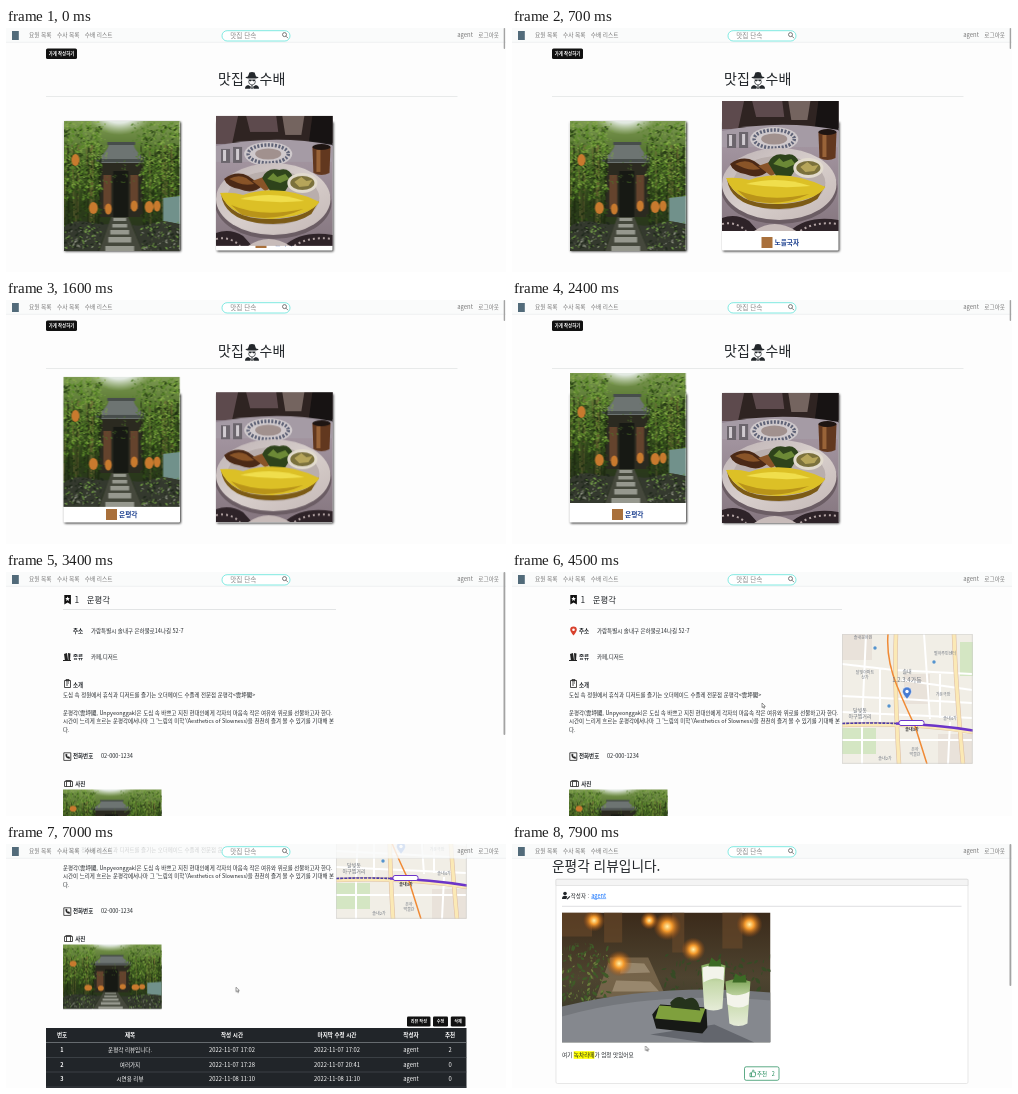
Recreate the animation shown at these times as an HTML page. Size 500 by 244 pixels, loop 8000 ms.

```html
<!DOCTYPE html>
<html lang="ko">
<head>
<meta charset="utf-8">
<title>맛집 수배</title>
<style>
html,body{margin:0;width:100%;height:100%;overflow:hidden;background:#fff}
svg.stage{display:block;width:100vw;height:100vh}
text{font:5.5px "Noto Sans CJK KR","Noto Sans CJK JP","Noto Sans CJK",sans-serif;fill:#212529;white-space:pre}
.b{font-weight:700}
.nav text{font-size:5.65px;fill:#777}
.nav .hint{font-size:6.6px;fill:#858585}
.h1{font-size:14px}
.para text{font-size:5.47px}
.btn rect{fill:#111}
.btn text{fill:#fff;font-size:4.1px;font-weight:700;text-anchor:middle}
.cap{font-size:6.7px;font-weight:700;fill:#1b3f8f}
.table text{fill:#fff;text-anchor:middle}
.map text{font-size:4px;fill:#6f7680;text-anchor:middle}
.base{fill:#fff;filter:drop-shadow(1px 1.5px 1.3px rgba(0,0,0,.8))}
.thumb{fill:#a3a3a3}
.list,.detail,.review,.late,.right,.left,.scroll,.bar,.fade{animation:8s infinite}
.list{animation-name:list;animation-timing-function:step-end}
.detail{animation-name:detail;animation-timing-function:step-end}
.review{animation-name:review;animation-timing-function:step-end}
.late{animation-name:late;animation-timing-function:step-end}
.right{animation-name:right}
.left{animation-name:left}
.scroll{animation-name:scroll}
.bar{animation-name:bar}
.fade{animation-name:fade;animation-timing-function:linear}
.cursor{animation:move 8s ease-in-out infinite,show 8s step-end infinite}
@keyframes list{0%{visibility:visible}42.5%,100%{visibility:hidden}}
@keyframes detail{0%{visibility:hidden}42.5%{visibility:visible}95%,100%{visibility:hidden}}
@keyframes review{0%{visibility:hidden}95%,100%{visibility:visible}}
@keyframes late{0%{visibility:hidden}45%{visibility:visible}95%,100%{visibility:hidden}}
@keyframes show{0%{visibility:hidden}43.75%,100%{visibility:visible}}
@keyframes right{
  0%{transform:translateY(-5px);animation-timing-function:cubic-bezier(.2,.6,.3,1)}
  7.8%,12.5%{transform:translateY(-20px);animation-timing-function:ease}
  22.5%,100%{transform:none}}
@keyframes left{
  0%,15%{transform:none;animation-timing-function:ease}
  25%,100%{transform:translateY(-20px)}}
@keyframes scroll{
  0%,58.75%{transform:none;animation-timing-function:cubic-bezier(.35,.1,.35,1)}
  67.5%,100%{transform:translateY(-117px)}}
@keyframes bar{
  0%,58.75%{transform:none;animation-timing-function:cubic-bezier(.35,.1,.35,1)}
  67.5%,100%{transform:translateY(79px)}}
@keyframes fade{0%,52.5%{opacity:1}56.25%,58.75%{opacity:0}60%,73.75%{opacity:1}77.5%,100%{opacity:0}}
@keyframes move{
  0%,43.75%{transform:translate(104px,122px)}
  52.5%,85.5%{transform:translate(250px,131px)}
  92.5%,100%{transform:translate(133.5px,202px)}}
</style>
</head>
<body>
<svg class="stage" viewBox="0 0 500 244" preserveAspectRatio="none">
<defs>
  <linearGradient id="wood" x2="0" y2="1"><stop stop-color="#7d9a52"/><stop offset=".3" stop-color="#4c6a28"/><stop offset=".65" stop-color="#2a3d18"/><stop offset="1" stop-color="#2b3024"/></linearGradient>
  <radialGradient id="sky" cx=".5" cy=".1"><stop stop-color="#f4f6f5"/><stop offset=".6" stop-color="#e2e9e2"/><stop offset="1" stop-color="#c5d4b4" stop-opacity="0"/></radialGradient>
  <linearGradient id="cloth" x2="0" y2="1"><stop stop-color="#6f6270"/><stop offset=".35" stop-color="#a2949f"/><stop offset="1" stop-color="#85767f"/></linearGradient>
  <linearGradient id="plate" x2="1" y2="1"><stop stop-color="#bdb2b4"/><stop offset=".5" stop-color="#d8cfcc"/><stop offset="1" stop-color="#c4b8b6"/></linearGradient>
  <linearGradient id="dusk" x2="0" y2="1"><stop stop-color="#3b2a1a"/><stop offset=".5" stop-color="#4e4430"/><stop offset="1" stop-color="#2e3324"/></linearGradient>
  <linearGradient id="latte" x2="0" y2="1"><stop stop-color="#7da356"/><stop offset=".4" stop-color="#c4d8a8"/><stop offset="1" stop-color="#e6ecd8"/></linearGradient>
  <radialGradient id="glow"><stop stop-color="#fff0a8"/><stop offset=".35" stop-color="#f59a2c"/><stop offset="1" stop-color="#a04a10" stop-opacity="0"/></radialGradient>

  <symbol id="garden" viewBox="0 0 117 130" preserveAspectRatio="none">
    <path fill="url(#wood)" d="M0 0h117v130H0z"/>
    <ellipse cx="56" cy="8" rx="36" ry="30" fill="url(#sky)"/>
    <path fill="#2b2a20" d="M36 40h44v56H36z"/>
    <path fill="#64432d" d="M40 54h8v34h-8zM67 54h8v34h-8z"/>
    <path fill="#171914" d="M50 50h15v46H50z"/>
    <path fill="#6d7472" d="M32 38q11-5 14-15h24q3 10 14 15l-3 4H35z"/>
    <path fill="#474d4b" d="M44 21h28v3H44zM33 38h50v3H33z"/>
    <g id="stems" fill="none" stroke-width=".8"></g>
    <g id="leaves"></g>
    <path fill="#71918b" d="M100 77l17-2v28l-17-3z"/>
    <path fill="#34392e" d="M0 106q10-8 24-5t22 2l-12 27H0zM117 104q-14-6-26-2t-22 2l10 26h38z"/>
    <path fill="#45483c" d="M48 96h17l14 34H36z"/>
    <path fill="#96988e" d="M50 97h13v3H50zM49 103h15v3.500H49zM47 109h19v4.500H47zM45 116h23v5.500H45zM42 125h29v5H42z"/>
    <g id="shrubs"></g>
    <g fill="#c87a2e"><ellipse cx="12" cy="39" rx="4" ry="6"/><ellipse cx="30" cy="87" rx="4.500" ry="6"/><ellipse cx="45" cy="88" rx="3.500" ry="5.500"/><ellipse cx="71" cy="85" rx="3.500" ry="5.500"/><ellipse cx="86" cy="86" rx="4.500" ry="6"/><ellipse cx="94" cy="85" rx="3.500" ry="5.500"/></g>
  </symbol>

  <symbol id="meal" viewBox="0 0 116 130" preserveAspectRatio="none">
    <path fill="url(#cloth)" d="M0 0h116v130H0z"/>
    <path fill="#2f2422" d="M0 0h116v27H0z"/>
    <path fill="#5d4a4d" d="M0 0h22l-6 28H0zM30 0h30l2 16H34z"/>
    <path fill="#74645f" d="M66 0h22l-3 19H69z"/>
    <path fill="#171313" d="M96 0h20v30H92z"/>
    <path fill="#a59ba5" d="M0 30q58-12 116-1v17H0z"/>
    <ellipse cx="52" cy="38" rx="24" ry="12" fill="#cfc9cc"/>
    <ellipse cx="52" cy="38" rx="20" ry="9" fill="none" stroke="#5f6377" stroke-width="3.500" stroke-dasharray="2 1.500"/>
    <ellipse cx="52" cy="38" rx="13" ry="5.500" fill="#a1918e"/>
    <path fill="#6b656c" d="M5 33h9v14H5zM17 31h9v16h-9z"/><path fill="#d0cbd0" d="M7 34h3v11H7zM20 33h3v11h-3z"/>
    <path fill="#62381f" d="M96 31q9-4 18 0l-1 26q-8 4-16 0z"/><path fill="#996338" d="M100 34h4v22h-4z"/><ellipse cx="105" cy="31" rx="9" ry="3" fill="#1e1512"/>
    <ellipse cx="57" cy="87" rx="58" ry="36" fill="#6b5d64"/>
    <ellipse cx="57" cy="83" rx="57" ry="36" fill="url(#plate)"/>
    <ellipse cx="57" cy="82" rx="46" ry="27" fill="#b9aeac"/>
    <path fill="#4b2916" d="M8 63q12-9 24-3l14 10q-9 9-23 3-12-2-15-10z"/>
    <path fill="#895428" d="M13 63q9-5 17-1l8 6q-9 2-16-1zM36 65l20-7 9 9-16 8z"/>
    <path fill="#2e431b" d="M46 62q5-11 17-8 10-3 14 8l-8 13H54z"/>
    <path fill="#6c8936" d="M51 63l6-6 4 4 8-3 4 5-9 4z"/>
    <ellipse cx="86" cy="67" rx="15" ry="10" fill="#e2dbce"/><ellipse cx="86" cy="67" rx="12" ry="7" fill="#7b713c"/>
    <path fill="#b6a55a" d="M78 66l7-5 5 4 6-1-4 6-9 1z"/>
    <path fill="#7c5b16" d="M5 78q10 25 46 25 40 1 52-19l-8 14q-18 13-54 9Q8 102 5 78z"/>
    <path fill="#dcc026" d="M4 77q13-1 23 2 37-12 76 7-9 14-47 17Q14 103 4 77z"/>
    <path fill="#f0de4c" d="M24 83q33-9 64 2-31 3-64-2z"/>
    <path fill="#b99419" d="M15 89q30 13 72 4-30 14-61 6z"/>
    <path fill="#2e2328" d="M0 117q14-5 27 3l9 10H0zM68 130q17-16 48-11v11z"/>
    <path fill="none" stroke="#b3a4a4" stroke-width="2" stroke-dasharray="2 3" d="M0 123q14-3 24 7M78 130q14-10 38-7"/>
    <path fill="#c7bbb9" d="M32 130q20-14 42 0z"/>
  </symbol>

  <symbol id="drinks" viewBox="0 0 208 130" preserveAspectRatio="none">
    <path fill="url(#dusk)" d="M0 0h208v130H0z"/>
    <path fill="#6b4a2b" d="M0 0h30v24H0zM42 0h18v30H42zM110 0h12v40h-12zM160 0h20v36h-20z" opacity=".6"/>
    <path fill="#8b7558" d="M48 45h38l18 40H34z" opacity=".65"/>
    <path fill="#a8987c" d="M60 50l22 1 6 9-30 1zM54 68l34 1 9 10H50z" opacity=".7"/>
    <g id="hedge"></g>
    <path fill="#74777c" d="M0 94q100-24 208-14v50H0z"/>
    <path fill="#8e9196" d="M0 104q90-26 208-16v42H0z" opacity=".7"/>
    <path fill="#4e5157" d="M88 122l54 8h50l-40-18z" opacity=".6"/>
    <g fill="url(#glow)"><circle cx="57" cy="51" r="13"/><circle cx="105" cy="14" r="14"/><circle cx="131" cy="37" r="12"/><circle cx="32" cy="8" r="11"/><circle cx="87" cy="8" r="9"/><circle cx="187" cy="12" r="13"/></g>
    <path fill="#171916" d="M90 102l8-10 46 3 1 20-5 6-46-5z"/>
    <path fill="#7fa03d" d="M97 93l46 3-5 14-45-4z"/>
    <path fill="#25331c" d="M108 90q8-9 15-3 9-5 13 4l2 7-29-3z"/>
    <path fill="url(#latte)" d="M139 53q12-5 24 0l-3 43q-9 4-18 0z"/>
    <path fill="#f3f4eb" d="M140 55q11-4 22 0l-1 13q-8-5-20 2z"/>
    <path fill="url(#latte)" d="M163 69q12-5 25 0l-3 42q-9 5-18 0z"/>
    <path fill="#f3f4eb" d="M164 80q10 6 23-1l-1 13q-9 6-21 0z"/>
    <path fill="#3c6a25" d="M146 54l3-9 5 4 4-3 1 8zM170 70l3-9 5 3 5-2 1 8z"/>
  </symbol>
</defs>

<path fill="#fdfdfd" d="M0 0h500v244H0z"/>

<g class="list">
  <g class="btn"><rect x="40" y="20.500" width="31" height="10.500" rx="1.600"/><text x="55.500" y="27.300" style="font-size:4.400px">가게 작성하기</text></g>
  <text class="h1" x="212" y="56.200">맛집</text><text class="h1" x="253.500" y="56.200">수배</text>
  <g fill="#23272b">
    <path d="M242 48.500l1.400-3.900q2.600-1 5.200 0l1.400 3.900q2.600.5 2.600 1.100t-2.600.8h-8q-2.600-.2-2.600-.8t2.600-1.100z"/>
    <path d="M242.600 51.400h3l.4.500.4-.5h3v1.200q-1.200 1.500-2.700.1l-.7-.5-.7.5q-1.500 1.400-2.700-.1z"/>
    <path d="M239 60.700q0-3 3.200-3.700l2.800 1.700-.6 2zM253 60.700q0-3-3.200-3.700l-2.800 1.700.6 2zM245.200 57.300h1.600l-.4 1.200.5 2.200h-1.800l.5-2.200z"/>
    <path fill="none" stroke="#23272b" stroke-width=".7" d="M242.400 53.300q.4 3.500 3.600 3.700 3.200-.2 3.600-3.700"/>
  </g>
  <path stroke="#e0e2e3" stroke-width=".7" d="M40 68.500h411.500"/>

  <rect class="base" x="57.500" y="93" width="116.500" height="129.500" rx="1"/>
  <rect x="100" y="209" width="11" height="11" fill="#a9703b"/><text class="cap" x="113" y="217">운평각</text>
  <use class="left" href="#garden" x="57.500" y="93" width="116.500" height="130"/>

  <rect class="base" x="210" y="93" width="116.500" height="129.500" rx="1"/>
  <rect x="249.500" y="209" width="11" height="11" fill="#a9703b"/><text class="cap" x="262.500" y="217">노을국자</text>
  <use class="right" href="#meal" x="210" y="93" width="116.500" height="130"/>
</g>

<g class="detail">
  <g class="scroll">
    <path fill="#111" d="M58.300 23h6.600v9.500l-3.300-2-3.300 2z"/><path fill="#fff" d="M61.600 24.500l.7 1.500 1.600.2-1.200 1.100.3 1.600-1.400-.8-1.400.8.3-1.600-1.200-1.100 1.600-.2z"/>
    <text x="68.500" y="30.500" style="font-size:8.400px">1</text><text x="80.800" y="30.500" style="font-size:8.400px">운평각</text>
    <path stroke="#d6d8da" stroke-width=".7" d="M57 37.500h273"/>

    <text class="b" x="67" y="60.600">주소</text><text x="85" y="60.600">가람특별시 솔내구 은하물로14나길 52-7</text>
    <text class="b" x="67" y="87.100">종류</text><text x="85" y="87.100">카페,디저트</text>
    <path fill="#222" d="M58 82l3-1 1 7-3 1zM62 81l2.500.6-.5 7-1.500.4zM57 88h8v1h-8z"/>
    <g fill="none" stroke="#222" stroke-width=".8"><path d="M58.500 108.500h6v7h-6zM60 107.500h3v1.600h-3zM60 111h3M60 113h2"/><path d="M57.800 180.800h7v7.600h-7z"/><path d="M59.500 182.500q0 4 4 4.200l.4-1.300-1.200-.8-.8.5-1-1.400.5-.7-.7-1z" fill="#222" stroke-width=".3"/><path d="M58.500 209.500h8v5h-8zM60.500 209.500v5M64.500 209.500v5M59.500 208.500h6"/></g>
    <text class="b" x="67" y="114.800">소개</text>
    <g class="para">
      <text x="57" y="125">도심 속 정원에서 휴식과 디저트를 즐기는 오더메이드 수플레 전문점 운평각&lt;雲坪閣&gt;</text>
      <text x="57" y="142.500">운평각(雲坪閣, Unpyeonggak)은 도심 속 바쁘고 지친 현대인에게 각자의 마음속 작은 여유와 위로를 선물하고자 한다.</text>
      <text x="57" y="151">시간이 느리게 흐르는 운평각에서나마 그 '느림의 미학'(Aesthetics of Slowness)을 천천히 즐겨 볼 수 있기를 기대해 본</text>
      <text x="57" y="159.600">다.</text>
    </g>
    <text class="b" x="67" y="186.200">전화번호</text><text x="95" y="186.200" style="font-size:5.600px">02-000-1234</text>
    <text class="b" x="69.300" y="213.600">사진</text>
    <use href="#garden" x="57" y="217.500" width="98.500" height="64.500"/>

    <g class="late">
      <path fill="#d8402c" d="M61.500 63.500q-3.300-4-3.300-5.800a3.300 3.300 0 0 1 6.600 0q0 1.800-3.300 5.800z"/><circle cx="61.500" cy="57.700" r="1.300" fill="#fff"/>
      <svg class="map" x="330" y="62" width="130.500" height="129.500" viewBox="0 0 130.500 129.500">
        <path fill="#f1eee6" d="M0 0h131v130H0z"/>
        <path fill="#e9e2da" d="M0 0h30v26H0zM62 40h26v30H62zM96 100h34v30H96z"/>
        <path fill="#d4e6c3" d="M0 94h34v26H0zM118 8h13v34h-13z"/>
        <g fill="none" stroke="#fff" stroke-width="2"><path d="M0 30l52 6 78 4M0 62l60 3 70 4M24 0l-4 90M82 0l6 85M0 106h130M20 130V92M108 88l-2 42M60 46l70 10M0 78l130 6M38 34v56M98 40v44"/></g>
        <path fill="none" stroke="#dfc0a6" stroke-width="4.500" d="M54 0q-2 45 3 130M0 91q70-3 131 7M112 0q2 55 9 130"/>
        <path fill="none" stroke="#fbe9b5" stroke-width="3.300" d="M54 0q-2 45 3 130M0 91q70-3 131 7M112 0q2 55 9 130"/>
        <path fill="none" stroke="#f08a35" stroke-width="1.500" d="M46 0q-2 25 9 52 10 24 18 40l12 38"/>
        <path fill="none" stroke="#4a3aa8" stroke-width="1.600" stroke-dasharray="3 1" d="M0 89.500q30-1 54 0"/>
        <path fill="none" stroke="#6c35c9" stroke-width="2.400" d="M54 89.500q40 1 77 7"/>
        <rect x="57" y="86.500" width="25" height="5" rx="2" fill="#fff" stroke="#6c35c9" stroke-width="1"/>
        <text x="21" y="5">솔내문화원</text><text x="23" y="40">달빛아파트<tspan x="23" dy="5">상가</tspan></text>
        <text x="103" y="21">별하주민센터</text><text x="101" y="62">가온극장</text>
        <text x="65" y="39" style="font-size:5px">솔내</text><text x="65" y="48" style="font-size:6px">1.2.3.4가동</text>
        <text x="18" y="78" style="font-size:5px">달빛동<tspan x="18" dy="6">아구찜거리</tspan></text>
        <text class="b" x="70" y="97" style="fill:#333">솔내3가</text><text x="108" y="86">솔내4가</text>
        <text x="73" y="117">은하<tspan x="73" dy="5">박물관</tspan></text><text x="43" y="126">솔내2가</text>
        <g fill="#5594cf"><circle cx="33" cy="14" r="1.700"/><circle cx="92" cy="28" r="1.700"/><circle cx="47" cy="72" r="1.700"/></g>
        <path fill="#477bd2" stroke="#fff" stroke-width=".5" d="M65 65q-4.500-5-4.500-7.500a4.500 4.500 0 0 1 9 0q0 2.500-4.500 7.500z"/><circle cx="65" cy="57.500" r="1.700" fill="#fff"/>
        <path fill="none" stroke="#ccc" stroke-width=".6" d="M.3.300h130v129H.300z"/>
      </svg>
    </g>

    <g class="btn"><rect x="401" y="289.500" width="23.500" height="10" rx="1.300"/><text x="412.800" y="296">리뷰 작성</text><rect x="427" y="289.500" width="15" height="10" rx="1.300"/><text x="434.500" y="296">수정</text><rect x="444.800" y="289.500" width="14.700" height="10" rx="1.300"/><text x="452.100" y="296">삭제</text></g>
    <path fill="#212529" d="M40 301h420.500v60H40z"/>
    <path stroke="#555b60" stroke-width=".5" d="M40 330.500h420.500M40 345h420.500M40 360h420.500"/><path stroke="#858a8f" stroke-width=".7" d="M40 315.500h420.500"/>
    <g class="table" id="rows"></g>
  </g>
</g>

<g class="review">
  <text x="40" y="27" style="font-size:13.700px">운평각 리뷰입니다.</text>
  <rect x="44" y="35" width="412" height="204.500" rx="1.500" fill="#fff" stroke="#d8d8d8" stroke-width=".6"/><path fill="#f4f4f4" stroke="#d8d8d8" stroke-width=".6" d="M44 35.500h412v6H44z"/>
  <g fill="#212529"><circle cx="53" cy="49.500" r="1.800"/><path d="M50 55q0-3.200 3-3.200 1.500 0 2.300.8l-1 2.400zM55 54.500l2.500-2.500.8.800-2.500 2.400-1 .200z"/></g>
  <text x="58.800" y="53.500">작성자 :</text><text x="79.200" y="53.500" style="fill:#0d6efd;font-size:5.600px">agent</text><path stroke="#0d6efd" stroke-width=".5" d="M79.200 54.600h15"/>
  <path stroke="#d0d2d4" stroke-width=".7" d="M50 62.300h399.500"/>
  <use href="#drinks" x="50" y="68.500" width="208.500" height="130"/>
  <path fill="#ff0" d="M61.700 207.200h20.700v7.600H61.700z"/><text x="50" y="213.100" style="font-size:5.600px">여기 녹차라떼가 엄청 맛있어요</text>
  <rect x="232.500" y="222.800" width="34.500" height="13.500" rx="1.700" fill="#fff" stroke="#198754" stroke-width=".7"/>
  <path fill="none" stroke="#198754" stroke-width=".7" d="M238 229h1.500v3.700H238zM239.500 229.200l1.700-3.400q1 .2.600 2.500h1.700q.5 3.400-.8 4.400h-3.200"/>
  <text x="245" y="231.600" style="fill:#198754">추천</text><text x="259.700" y="231.600" style="fill:#198754">2</text>
</g>

<g class="nav">
  <path fill="#f9fafa" fill-opacity=".82" d="M0 0h500v14H0z"/><path stroke="#e6e8e9" stroke-width=".6" d="M0 14.300h500"/>
  <rect x="6" y="3" width="6.800" height="9" fill="#526b7a"/>
  <text x="23" y="9.200">요원 목록</text><text x="51" y="9.200">수사 목록</text><text x="78.800" y="9.200">수배 리스트</text>
  <rect x="216" y="2.700" width="68" height="10.300" rx="5.100" fill="#fff" stroke="#74e8df" stroke-width=".9"/>
  <text class="hint" x="224.200" y="9.700">맛집 단속</text>
  <g fill="none" stroke="#444" stroke-width=".7"><circle cx="278.500" cy="6.600" r="2"/><path d="M280 8.200l2 2"/></g>
  <text x="451.300" y="9.200" style="font-size:5.900px">agent</text><text x="472.300" y="9.200">로그아웃</text>
</g>

<g class="list"><rect class="thumb" x="497.700" width="1.400" height="21" rx=".7"/></g>
<g class="detail"><g class="fade"><rect class="thumb bar" x="497.500" width="1.800" height="163" rx=".9"/></g></g>
<g class="review"><rect class="thumb" x="497.500" width="1.800" height="142" rx=".9"/></g>
<path class="cursor" fill="#fff" stroke="#333" stroke-width=".5" d="M0 0v4.600l1.100-1 .8 1.800.8-.4-.8-1.700h1.500z"/>
</svg>
<script>
let seed = 7;
const rnd = (a, b) => a + (b - a) * ((seed = seed * 16807 % 2147483647) / 2147483647);
const byId = id => document.getElementById(id);

// Scatters small leaf shapes inside a box.
function scatter(id, color, count, x0, x1, y0, y1, size) {
  let d = '';
  for (let i = 0; i < count; i++) {
    const x = rnd(x0, x1), y = rnd(y0, y1), w = rnd(-size, size), h = rnd(size * .3, size);
    d += `M${x.toFixed(1)} ${y.toFixed(1)}q${w.toFixed(1)} 0 ${w.toFixed(1)} ${h.toFixed(1)}q${(-w).toFixed(1)} 0 ${(-w).toFixed(1)} ${(-h).toFixed(1)}`;
  }
  byId(id).innerHTML += `<path fill="${color}" d="${d}"/>`;
}

// Slightly leaning bamboo canes.
function canes(color, count, x0, x1) {
  let d = '';
  for (let i = 0; i < count; i++) d += `M${rnd(x0, x1).toFixed(1)} 104l${rnd(-4, 4).toFixed(1)} -80`;
  byId('stems').innerHTML += `<path stroke="${color}" d="${d}"/>`;
}

for (const [x0, x1] of [[0, 38], [78, 117]]) {
  canes('#6f6a35', 9, x0, x1);
  canes('#1d2912', 9, x0, x1);
  scatter('leaves', '#2f4a18', 260, x0, x1, 4, 100, 4);
  scatter('leaves', '#5c8a2a', 330, x0, x1, 0, 78, 3.5);
  scatter('leaves', '#8db24a', 200, x0, x1, 0, 66, 2.6);
  scatter('leaves', '#1f2f12', 170, x0, x1, 30, 104, 3.2);
  scatter('shrubs', '#1f281b', 60, x0, x1, 100, 126, 4);
  scatter('shrubs', '#6b9442', 60, x0, x1, 100, 126, 3);
  scatter('shrubs', '#878b7c', 26, x0, x1, 108, 128, 3);
}
scatter('leaves', '#7aa044', 90, 20, 44, 0, 44, 3);
scatter('leaves', '#567f2e', 90, 70, 92, 0, 48, 3);
scatter('leaves', '#4d7228', 40, 38, 80, 38, 62, 2.6);
scatter('hedge', '#3f5a28', 90, 0, 48, 30, 88, 6);
scatter('hedge', '#6c7d3c', 60, 0, 44, 40, 88, 4);
scatter('hedge', '#364a25', 70, 100, 208, 40, 78, 6);

const cols = [56, 124, 226, 331, 405, 444];
const rows = [
  ['번호', '제목', '작성 시간', '마지막 수정 시간', '작성자', '추천'],
  [1, '운평각 리뷰입니다.', '2022-11-07 17:02', '2022-11-07 17:02', 'agent', 2],
  [2, '여러가지', '2022-11-07 17:28', '2022-11-07 20:41', 'agent', 0],
  [3, '시연용 리뷰', '2022-11-08 11:10', '2022-11-08 11:10', 'agent', 0]
];
byId('rows').innerHTML = rows.map((row, r) => row.map((cell, c) => {
  const bold = r === 0 || c === 0 ? ' class="b"' : '';
  const size = r && c > 1 ? 5.8 : 5.55;
  return `<text${bold} x="${cols[c]}" y="${(310.2 + r * 14.75).toFixed(1)}" style="font-size:${size}px">${cell}</text>`;
}).join('')).join('');
</script>
</body>
</html>
```
